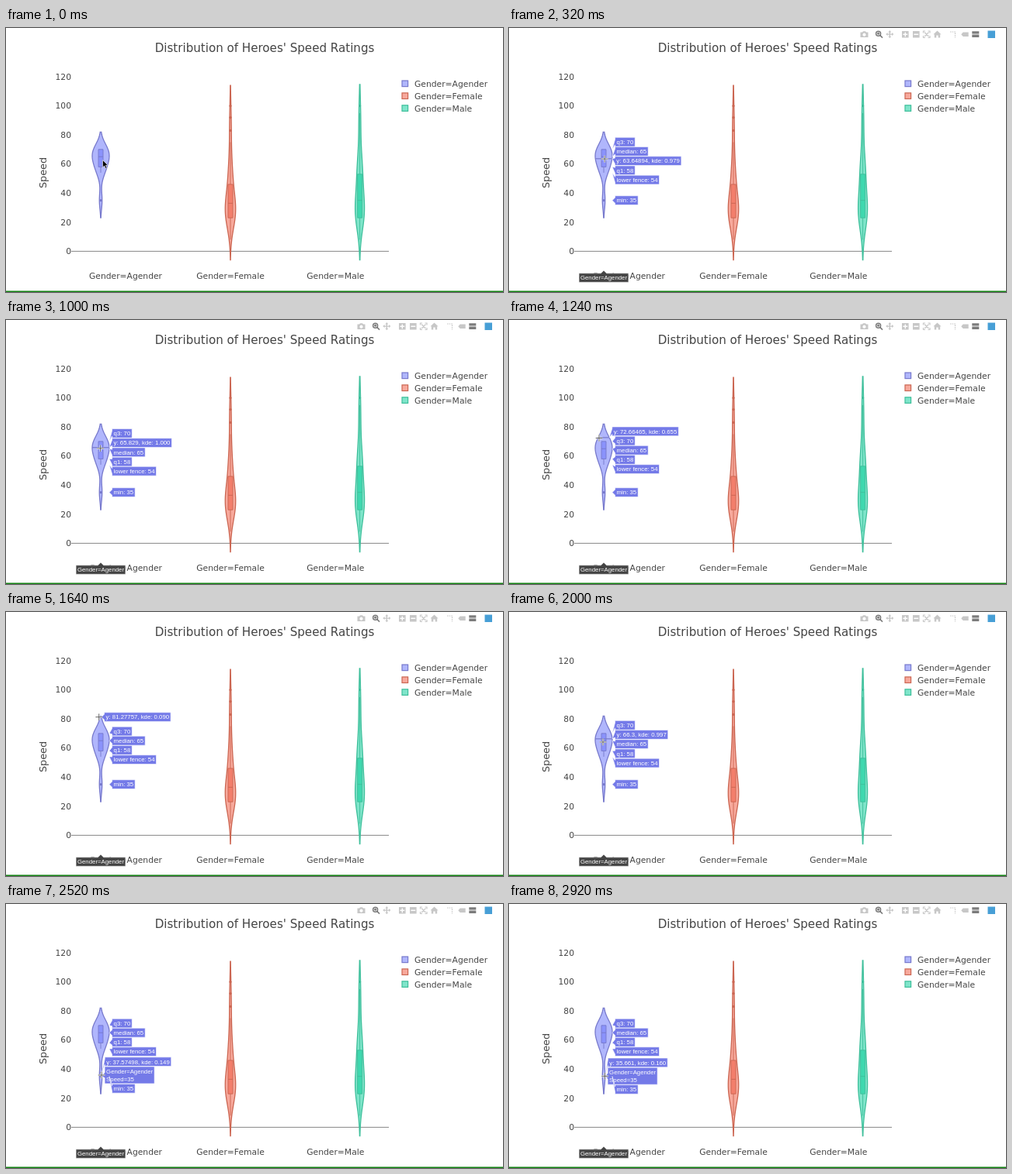
Write an HTML page that moves like this. It is 640x341 px and loops after 2.96 s.

```html
<!DOCTYPE html>
<html lang="en">
<head>
<meta charset="utf-8">
<title>Violin plot hover</title>
<style>
  html, body { margin: 0; width: 100%; height: 100%; overflow: hidden; background: #fff; }
  svg { display: block; width: 640px; height: 341px; }
  text { font-family: "DejaVu Sans", Verdana, sans-serif; font-size: 10.75px; fill: #444; white-space: pre; }
  .hover text { font-family: "Liberation Sans", Arial, sans-serif; font-size: 7.8px; fill: #fff; }
  .hover path { stroke: #fff; stroke-width: .6; }
</style>
</head>
<body>
<svg viewBox="0 0 640 341">
  <g id="chart"></g>
  <g id="modebar" fill="#444" fill-opacity=".3" stroke="#444" stroke-opacity=".3" stroke-width="0">
    <path fill-rule="evenodd" d="M452.5 5.5h2.5l1-1.3h3l1 1.3h2.5v6.5h-10zM457.5 6.6a2.1 2.1 0 1 0 .01 0z"/>
    <g fill="none" stroke-width="1.5" stroke-opacity=".7"><circle cx="475.6" cy="7.2" r="3"/><path d="M478 9.6l3 3M474 7.2h3.2M475.6 5.6v3.2"/></g>
    <path d="M490.3 3l2 2.4h-1.3v2h2v-1.3l2.4 2l-2.4 2v-1.3h-2v2h1.3l-2 2.4l-2-2.4h1.3v-2h-2v1.3l-2.4-2l2.4-2v1.3h2v-2h-1.3z"/>
    <path fill-rule="evenodd" d="M506 4h8.6v8.6h-8.6zM509.6 5.4v2.2h-2.2v1.4h2.2v2.2h1.4v-2.2h2.2v-1.4h-2.2v-2.2z"/>
    <path fill-rule="evenodd" d="M520 4h8.6v8.6h-8.6zM521.4 7.6h5.8v1.4h-5.8z"/>
    <path fill="none" stroke-width="1.2" d="M533.5 6.5v-2.5h2.5M539.5 4h2.5v2.5M542 10v2.5h-2.5M536 12.5h-2.5v-2.5M535 5.5l5.5 5.5M540.5 5.5l-5.5 5.5"/>
    <path d="M551.5 3.6l5 4.6h-1.3v4.2h-2.5v-2.8h-2.4v2.8h-2.5v-4.2h-1.3z"/>
    <path fill="none" stroke-width="1.2" stroke-dasharray="1.6 1" d="M568 5h6.5v7.5"/>
    <path d="M582.3 8.2l2.4-2.7h7v5.4h-7z"/>
    <path fill-opacity=".7" d="M596.3 4.3h9v3.3h-9zM596.3 8.6h9v3.3h-9z"/>
    <rect x="616.5" y="3.5" width="9.5" height="9.5" fill="#479fd6" fill-opacity="1"/>
  </g>
  <g id="hover" class="hover"></g>
  <g id="pointer"></g>
</svg>
<script>
const LOOP = 2960, STEP = 40, HOVER_START = 80;
const byId = id => document.getElementById(id);
const yOf = v => 288.4 - 1.879 * v;
const bell = (v, mean, sd) => Math.exp(-(((v - mean) / sd) ** 2) / 2);
const mix = parts => v => parts.reduce((sum, [height, mean, sd]) => sum + height * bell(v, mean, sd), 0);

const speeds = [35, 54, 58, 58, 65, 65, 65, 70, 70, 70], bandwidth = 5.944;
const density = mix(speeds.map(s => [1, s, bandwidth]));
const peak = density(65.2);
const kde = v => Math.min(1, density(v) / peak);

const violins = [
  { name: 'Agender', x: 122, tickX: 154, fill: '#636efa', line: '#7779cc', width: v => 11 * kde(v),
    span: [23.1, 81.9], box: [58, 65, 70], whiskers: [54, 70], dots: [35] },
  { name: 'Female', x: 289, tickX: 289, fill: '#ef553b', line: '#cb6652',
    width: mix([[6, 27, 12], [2.5, 50, 14], [1.1, 85, 16]]),
    span: [-6, 114], box: [23, 33, 46], whiskers: [8, 75], dots: [83, 92, 100] },
  { name: 'Male', x: 455.6, tickX: 424.3, fill: '#00cc96', line: '#3fbf9b',
    width: mix([[5.4, 27, 13], [3.2, 54, 14], [1.2, 90, 15]]),
    span: [-6, 114.7], box: [23, 35, 53], whiskers: [8, 95], dots: [100] }
];

function violin({ x, fill, line, width, span: [low, high], box: [q1, median, q3], whiskers, dots }) {
  const left = [], right = [], n = 80;
  for (let i = 0; i <= n; i++) {
    const v = low + (high - low) * i / n, y = yOf(v).toFixed(2);
    right.push(`${(x + width(v)).toFixed(2)} ${y}`);
    left.unshift(`${(x - width(v)).toFixed(2)} ${y}`);
  }
  return `<g fill="${fill}" fill-opacity=".5" stroke="${line}">
    <path stroke-width="1.3" d="M${right.concat(left).join('L')}Z"/>
    <path stroke-width=".9" d="M${x - 3} ${yOf(q1)}h6V${yOf(q3)}h-6Z
      M${x - 3} ${yOf(median)}h6M${x} ${yOf(q1)}V${yOf(whiskers[0])}M${x} ${yOf(q3)}V${yOf(whiskers[1])}"/>
    ${dots.map(d => `<circle cx="${x}" cy="${yOf(d)}" r="1.6" fill="${line}" fill-opacity="1" stroke="none"/>`).join('')}</g>`;
}

function chart() {
  const ticks = [0, 20, 40, 60, 80, 100, 120].map(v =>
    `<text x="84" y="${yOf(v) + 3.7}" text-anchor="end">${v}</text>`).join('');
  const names = violins.map(({ name, tickX, fill, line }, i) => {
    const y = 71.8 + 15.9 * i;
    return `<text x="${tickX}" y="324.3" text-anchor="middle">Gender=${name}</text>
      <rect x="510" y="${y - 3.8}" width="7.6" height="7.6" fill="${fill}" fill-opacity=".5" stroke="${line}" stroke-width="1.2"/>
      <text x="526" y="${y + 3.9}">Gender=${name}</text>`;
  }).join('');
  return `<rect y="339.5" width="640" height="1.5" fill="#128212"/>
    <text x="333" y="30.8" text-anchor="middle" style="font-size:15.1px">Distribution of Heroes' Speed Ratings</text>
    <text transform="translate(52 187) rotate(-90)" text-anchor="middle" style="font-size:12.8px">Speed</text>
    ${ticks}${names}<path d="M84 288.4H493" stroke="#888"/>${violins.map(violin).join('')}`;
}

// Each row: time, pointer x, pointer y, hovered value
const track = [
  [0, 124.5, 170.6, 62.4], [80, 124, 170.4, 62.4], [520, 122.5, 168, 64.68972], [960, 122.5, 168, 64.68972],
  [1240, 116, 152.5, 72.66465], [1640, 119.7, 135.7, 81.27757], [1720, 119.7, 135.7, 81.27757],
  [2000, 121, 168, 66.3], [2240, 122.5, 209, 45.23091], [2520, 123, 221, 37.57498], [2920, 123.5, 222.3, 35.661]
];
function trackAt(t) {
  const i = track.findIndex(row => row[0] > t);
  if (i < 0) return track[track.length - 1].slice(1);
  const a = track[i - 1], b = track[i], k = (t - a[0]) / (b[0] - a[0]);
  return a.slice(1).map((from, j) => from + (b[j + 1] - from) * k);
}

const ruler = document.createElement('canvas').getContext('2d');
ruler.font = '7.8px "Liberation Sans", Arial, sans-serif';
const textWidth = s => ruler.measureText(s).width;

// Neighbours that overlap merge into a block centred on their anchors
function stack(labels) {
  const blocks = [];
  for (const label of labels.sort((a, b) => a.y - b.y)) {
    let block = settle([label]);
    while (blocks.length && blocks[blocks.length - 1].bottom > block.top)
      block = settle(blocks.pop().items.concat(block.items));
    blocks.push(block);
  }
  for (const { items, top } of blocks) {
    let y = top;
    for (const item of items) {
      item.boxY = y + item.height / 2;
      y += item.height;
    }
  }
  return labels;
}
function settle(items) {
  let height = 0, sum = 0;
  for (const item of items) {
    sum += item.y - height - item.height / 2;
    height += item.height;
  }
  const top = sum / items.length;
  return { items, top, bottom: top + height };
}

function label(x, v, ...lines) {
  return { x, y: yOf(v), lines, height: 12.2 + 10.2 * (lines.length - 1) };
}
function drawLabel({ x, y, boxY, lines, height }) {
  const left = x + 3.6, half = height / 2 - .2;
  const width = Math.max(...lines.map(textWidth)) + 4;
  const rows = lines.map((line, i) =>
    `<text x="${left + 2}" y="${boxY + 2.8 + 10.2 * (i - (lines.length - 1) / 2)}">${line}</text>`).join('');
  return `<path fill="#747ae8" d="M${x} ${y}L${left} ${boxY + 3.6}V${boxY + half}h${width}v${-2 * half}H${left}V${boxY - 3.6}Z"/>${rows}`;
}

function hover(v) {
  const x = 122, edge = 133, reach = 11 * kde(v);
  const labels = [
    label(edge, 70, 'q3: 70'), label(edge, 65, 'median: 65'),
    label(x + reach, v, `y: ${+v.toFixed(5)}, kde: ${kde(v).toFixed(3)}`),
    label(edge, 58, 'q1: 58'), label(edge, 54, 'lower fence: 54')
  ];
  if (Math.abs(v - 35) < 4) labels.push(label(x + 1.5, 35, 'Gender=Agender', 'Speed=35'));
  labels.push(label(edge, 35, 'min: 35'));
  const name = 'Gender=Agender', half = textWidth(name) / 2 + 1.9;
  return `<path style="stroke:#7779cc;stroke-width:1.2" d="M${x - reach} ${yOf(v)}h${2 * reach}"/>
    ${stack(labels).map(drawLabel).join('')}
    <path fill="#444" d="M${x} 313.2l3.6 3.6H${x + half}v11.6H${x - half}v-11.6H${x - 3.6}Z"/>
    <text x="${x}" y="325.4" text-anchor="middle">${name}</text>`;
}

const arrow = '<path d="M0 0v9.4l2.2-2 1.5 3.4 1.7-.8-1.5-3.2h2.9z" fill="#000" stroke="#fff" stroke-width=".6"/>';
const cross = '<path d="M-4.3 0h8.6M0-4.3v8.6" stroke="#fff" stroke-width="2.2"/>' +
  '<path d="M-4.3 0h8.6M0-4.3v8.6" stroke="#555" stroke-width=".9"/>';

function draw(now) {
  const t = Math.floor(now % LOOP / STEP) * STEP;
  const [x, y, value] = trackAt(t), hovering = t >= HOVER_START;
  byId('modebar').setAttribute('opacity', Math.min(1, t / 320));
  byId('hover').innerHTML = hovering ? hover(value) : '';
  byId('pointer').innerHTML = hovering ? cross : arrow;
  byId('pointer').setAttribute('transform', `translate(${x} ${y})`);
}

byId('chart').innerHTML = chart();
const start = performance.now();
(function tick() {
  draw(performance.now() - start);
  requestAnimationFrame(tick);
})();
</script>
</body>
</html>
```
